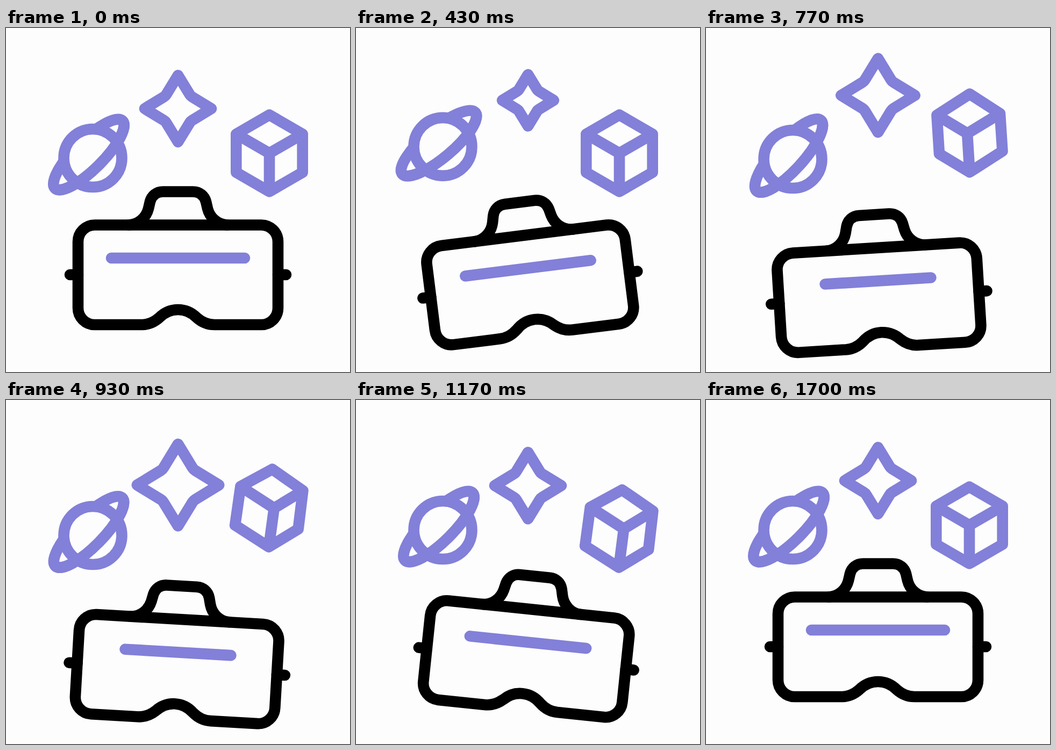
Animation of 640 by 640 pixels, one loop 1.73 s. Source, as an HTML page without scripts:

```html
<!DOCTYPE html>
<html lang="en">
<head>
<meta charset="utf-8">
<title>Headset</title>
<style>
  :root { --bg: #fdfdfd; --soft: #8280d8; --ease: cubic-bezier(.3333, 0, .6667, 1); }
  html, body { margin: 0; width: 100%; height: 100%; overflow: hidden; background: var(--bg); }
  svg { display: block; width: 640px; height: 640px; }
  .line { fill: none; stroke-width: 20.6; stroke-linecap: round; stroke-linejoin: round; }
  .soft { stroke: var(--soft); }
  .dark { stroke: #000; }
  .fixed { vector-effect: non-scaling-stroke; }

  .headset, .bar, .planet, .ring, .star, .spark, .lift, .cube {
    animation: 1730ms var(--ease) infinite;
  }
  .headset { transform-origin: 320px 428px; animation-name: sink, tilt; }
  .bar { animation-name: shrink; }
  .planet { animation-name: planet-hop; }
  .ring { animation-name: wobble; }
  .star { animation-name: star-hop; }
  .spark { animation-name: pulse; }
  .lift { animation-name: cube-hop; }
  .cube { animation-name: turn; }

  @keyframes sink {
    0%, 9.8%, 86.7%, 100% { translate: 0 0; }
    42.5%, 50.3% { translate: 0 42.5px; }
  }
  @keyframes tilt {
    0%, 98.3%, 100% { rotate: 0deg; }
    31.8%, 34.1% { rotate: -8.1deg; }
    61.8%, 63.6% { rotate: 6.2deg; }
  }
  @keyframes shrink {
    0%, 15.6%, 86.7%, 100% { scale: 1 1; }
    43.9%, 53.2% { scale: .795 1; }
  }
  @keyframes planet-hop {
    0%, 66.5%, 100% { translate: 0 0; }
    31.8% { translate: 0 -24px; }
    50.9% { translate: 0 11px; }
  }
  @keyframes wobble {
    0%, 59.5%, 100% { rotate: 0deg; }
    16.2% { rotate: 12.5deg; }
    34.7% { rotate: -4.2deg; }
  }
  @keyframes star-hop {
    0%, 8.1%, 79.2%, 100% { translate: 0 0; }
    41% { translate: 0 -30px; }
    57.2%, 61.3% { translate: 0 13px; }
  }
  @keyframes pulse {
    0%, 3.5%, 67.6%, 100% { scale: 1; }
    20.2% { scale: .75; }
    57.2% { scale: 1.24; }
  }
  @keyframes cube-hop {
    0%, 24.9%, 92.5%, 100% { translate: 0 0; }
    48% { translate: 0 -40px; }
    71.1% { translate: 0 9px; }
  }
  @keyframes turn {
    0%, 24.9%, 78.6%, 100% {
      d: path("M0 -71.3L61.7 -35.6L61.7 35.6L0 71.3L-61.7 35.6L-61.7 -35.6ZM-61.7 -35.6L0 0L61.7 -35.6M0 0L0 71.3");
    }
    37% {
      d: path("M-2.5 -73L53.5 -39L66.5 30L1.5 73L-51 43L-65 -29ZM-65 -29L-12 1L53.5 -39M-12 1L1.5 73");
    }
    54.9%, 65.3% {
      d: path("M5.5 -72L62.5 -32L53.5 39.5L-1 72.5L-64 32L-53.5 -40ZM-53.5 -40L9 .5L62.5 -32M9 .5L-1 72.5");
    }
  }
</style>
</head>
<body>
<svg viewBox="0 0 640 640" xmlns="http://www.w3.org/2000/svg">
  <g class="line soft">
    <g transform="translate(161.5 242)">
      <g class="planet">
        <g transform="translate(-7.5 -6.5)">
          <g class="ring"><ellipse rx="88.8" ry="27" transform="rotate(-45)"/></g>
        </g>
        <circle r="54" fill="var(--bg)"/>
        <!-- front half of the ring, over the globe -->
        <g transform="translate(-7.5 -6.5)">
          <g class="ring"><path d="M-88.8 0A88.8 27 0 0 0 88.8 0" transform="rotate(-45)"/></g>
        </g>
      </g>
    </g>

    <g transform="translate(320 150)">
      <g class="star">
        <path class="spark fixed" d="M0 -62L22 -26Q23.5 -23.5 26 -22L62 0L26 22Q23.5 23.5 22 26L0 62L-22 26Q-23.5 23.5 -26 22L-62 0L-26 -22Q-23.5 -23.5 -22 -26Z"/>
      </g>
    </g>

    <g transform="translate(490 233)">
      <g class="lift">
        <path class="cube" d="M0 -71.3L61.7 -35.6L61.7 35.6L0 71.3L-61.7 35.6L-61.7 -35.6ZM-61.7 -35.6L0 0L61.7 -35.6M0 0L0 71.3"/>
      </g>
    </g>
  </g>

  <g class="headset line">
    <g class="dark">
      <path d="M165 366.5H475A31 31 0 0 1 506 397.5V521A31 31 0 0 1 475 552H388C376 552 364 547 355 539C347 531 336 524 320 524C304 524 293 531 285 539C276 547 264 552 252 552H165A31 31 0 0 1 134 521V397.5A31 31 0 0 1 165 366.5Z"/>
      <path d="M228 366.5C247 366 261 352 265 336L268 323C271 312 280 304.500 292 304.500H348C360 304.500 369 312 372 323L375 336C379 352 393 366 412 366.5"/>
      <path d="M119 459H134M506 459H521"/>
    </g>
    <g class="soft" transform="translate(320 428)">
      <path class="bar fixed" d="M-124 0H124"/>
    </g>
  </g>
</svg>
</body>
</html>
```
